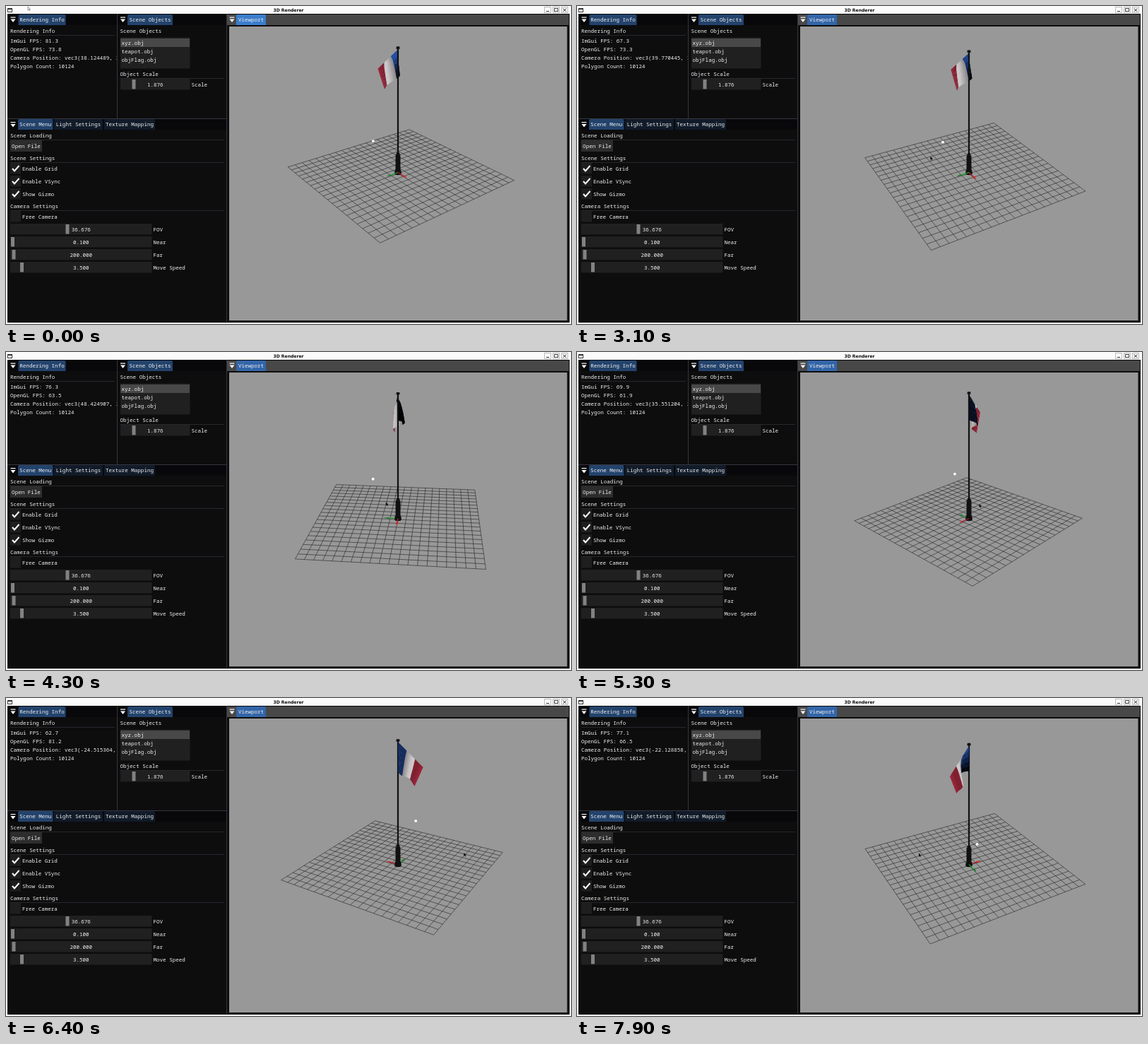
Write an HTML page with a canvas that moves like this. It is 800 by 450 pixels and loops after 8 s.

```html
<!DOCTYPE html>
<html lang="en">
<head>
<meta charset="utf-8">
<title>3D Renderer</title>
<style>
html, body { margin: 0; width: 100%; height: 100%; overflow: hidden; background: #000; }
canvas { display: block; width: 800px; height: 450px; }
</style>
</head>
<body>
<canvas id="stage" width="800" height="450"></canvas>
<script>
const ctx = document.getElementById('stage').getContext('2d');
const MONO = '7.55px "Noto Sans Mono", "DejaVu Sans Mono", monospace';
const LOOP = 8000, STEP = 100, DRAG_START = 2700;
const FOCAL = 627.5, DIST = 55, CX = 555, CY = 237;

// time, azimuth, elevation (degrees), pointer x, pointer y
const POSES = [
  [2100, 38, 28.4, 31, 1],
  [DRAG_START, 38, 28.4, 488, 214],
  [3700, 17.3, 28.4, 519, 211],
  [5300, -43.6, 26.8, 569.5, 215],
  [5900, -88.5, 27.5, 636.5, 221.5],
  [7100, -166, 32.2, 665, 215.5],
  [7900, -240.7, 34.7, 484, 219.5]
];

const noise = n => { const s = Math.sin(n * 12.9898) * 43758.5453; return s - Math.floor(s); };
const clamp = v => Math.max(0, Math.min(1, v));

function poseAt(t) {
  const next = POSES.findIndex(p => p[0] > t);
  const i = next < 0 ? POSES.length - 1 : Math.max(1, next);
  const a = POSES[i - 1], b = POSES[i], p = clamp((t - a[0]) / (b[0] - a[0]));
  const [azimuth, elevation, x, y] = a.slice(1).map((v, k) => v + (b[k + 1] - v) * p);
  // the first drag lifts the view and lets it sink again
  const lift = 5.5 * Math.sin(Math.PI * clamp((t - DRAG_START) / 1000));
  return { azimuth, elevation: elevation + lift, x, y };
}

function rect(x, y, w, h, color) {
  ctx.fillStyle = color;
  ctx.fillRect(x, y, w, h);
}

function text(s, x, y, align = 'left', font = MONO, color = '#f0f0f0') {
  ctx.font = font;
  ctx.fillStyle = color;
  ctx.textAlign = align;
  ctx.fillText(s, x, y + 2.6);
}

function trace(points) {
  ctx.beginPath();
  points.forEach(p => ctx.lineTo(p[0], p[1]));
}

function poly(points, color) {
  trace(points);
  ctx.fillStyle = color;
  ctx.fill();
}

function stroke(points, color, width) {
  trace(points);
  ctx.strokeStyle = color;
  ctx.lineWidth = width;
  ctx.stroke();
}

function disc(x, y, rx, ry, color) {
  ctx.beginPath();
  ctx.ellipse(x, y, rx, ry, 0, 0, Math.PI * 2);
  ctx.fillStyle = color;
  ctx.fill();
}

function tab(label, x, y, w, color) {
  ctx.beginPath();
  ctx.roundRect(x, y, w, 15, [2, 2, 0, 0]);
  ctx.fillStyle = color;
  ctx.fill();
  text(label, x + w / 2, y + 7.5, 'center');
}

function menuIcon(x, y) {
  rect(x - 3.5, y - 4, 7, 1.2, '#fff');
  poly([[x - 3.5, y - 1], [x + 3.5, y - 1], [x, y + 3.5]], '#fff');
}

function heading(label, x, y, right) {
  text(label, x, y);
  rect(x, y + 6, right - x, 1, '#28282d');
}

function slider(label, value, x, y, w, grab) {
  rect(x, y - 8, w, 15.5, '#202021');
  rect(grab, y - 7, 5, 13.5, '#828282');
  text(value, x + w / 2, y, 'center');
  text(label, x + w + 2, y);
}

function checkbox(label, y, on) {
  rect(6, y - 8, 15, 15.5, '#1e1e1f');
  if (on) stroke([[9, y], [12, y + 3.5], [18.5, y - 4]], '#fff', 2);
  text(label, 23, y);
}

function titleBar() {
  rect(0, 0, 800, 11, '#fbfbfb');
  text('3D Renderer', 400, 5.3, 'center', 'bold 6.1px "DejaVu Sans", sans-serif', '#111');
  rect(2, 3, 7, 6, '#333');
  rect(3, 5, 5, 3, '#fff');
  ctx.lineWidth = 1;
  for (let x = 762; x < 790; x += 12) {
    ctx.strokeStyle = '#bbb';
    ctx.strokeRect(x + .5, 1.5, 9, 8);
  }
  rect(765, 7, 4, 1, '#333');
  ctx.strokeStyle = '#444';
  ctx.strokeRect(776.5, 3.5, 5, 4);
  stroke([[788.5, 3.5], [793.5, 8]], '#333', 1);
  stroke([[793.5, 3.5], [788.5, 8]], '#333', 1);
}

function frames() {
  rect(0, 11, 800, 439, '#fbfbfb');
  rect(2, 11, 796, 437, '#08080a');
  rect(3, 27, 309, 420, '#0d0d0e');
  rect(313, 12, 484, 15, '#484848');
  rect(313, 27, 484, 420, '#0d0d0e');
  rect(157, 11, 1, 148, '#35353e');
  rect(312, 11, 1, 436, '#35353e');
  rect(2, 159, 310, 1, '#35353e');
  rect(3, 160, 309, 15, '#08080a');
}

function infoPanel(step, cam) {
  const rate = seed => (61 + 22 * noise(step + seed)).toFixed(1);
  heading('Rendering Info', 6, 35, 154);
  ctx.save();
  ctx.beginPath();
  ctx.rect(3, 27, 153.5, 131);
  ctx.clip();
  [
    'ImGui FPS: ' + rate(1),
    'OpenGL FPS: ' + rate(200),
    `Camera Position: vec3(${cam.x.toFixed(6)}, ${cam.y.toFixed(6)}`,
    'Polygon Count: 10124'
  ].forEach((s, i) => text(s, 6, 49 + i * 12));
  ctx.restore();
}

function panels(hovered) {
  const blue = '#23436c', dim = '#111b29';
  menuIcon(10, 19.5);
  menuIcon(165.5, 19.5);
  menuIcon(320, 19.5);
  menuIcon(10, 168);
  tab('Rendering Info', 17.5, 12, 67, blue);
  tab('Scene Objects', 172, 12, 64, blue);
  tab('Viewport', 326, 12, 42, hovered ? '#3b7dcc' : '#3365a8');
  tab('Scene Menu', 17, 160, 49.5, blue);
  tab('Light Settings', 68, 160, 69, dim);
  tab('Texture Mapping', 139, 160, 72, dim);

  text('Scene Objects', 161.5, 35);
  rect(162, 44.5, 98.5, 44, '#202021');
  rect(162, 46, 98, 12, '#484848');
  ['xyz.obj', 'teapot.obj', 'objFlag.obj'].forEach((s, i) => text(s, 163.5, 52 + i * 12));
  heading('Object Scale', 161.5, 96, 309);
  slider('Scale', '1.876', 162, 111, 98.5, 178.5);

  heading('Scene Loading', 6, 183, 309);
  rect(6, 190, 45, 16, '#2d2d2d');
  text('Open File', 28.5, 198, 'center');
  heading('Scene Settings', 6, 215, 309);
  ['Enable Grid', 'Enable VSync', 'Show Gizmo'].forEach((s, i) => checkbox(s, 230 + i * 18, true));
  heading('Camera Settings', 6, 283, 309);
  checkbox('Free Camera', 298, false);
  [['FOV', '36.676', 84.5], ['Near', '0.100', 7], ['Far', '200.000', 8.5], ['Move Speed', '3.500', 20]]
    .forEach(([label, value, grab], i) => slider(label, value, 6, 316 + i * 18, 200.5, grab));
}

function camera(azimuth, elevation) {
  const t = azimuth * Math.PI / 180, e = elevation * Math.PI / 180;
  const st = Math.sin(t), ct = Math.cos(t), se = Math.sin(e), ce = Math.cos(e);
  const near = (x, z) => x * ct + z * st;
  const project = (x, y, z) => {
    const v = near(x, z), k = FOCAL / (DIST - y * se - v * ce);
    return [CX + (x * st - z * ct) * k, CY - (y * ce - v * se) * k, k];
  };
  return { near, project, x: DIST * ce * ct, y: DIST * se };
}

function flag(cam) {
  const N = 18, M = 5, facing = cam.near(.27, .96);
  const colors = [[34, 80, 176], [206, 202, 204], [174, 38, 62]];
  const point = (u, w) => {
    const along = u * (1 - .32 * w);
    const y = 15.2 - 2.55 * u - w * (2.8 - .58 * u);
    const wave = -1.15 * Math.sin(u * Math.PI * 2) * (1 - u) * Math.sqrt(w);
    return cam.project(-2.72 * along + .27 * wave, y, .78 * along + .96 * wave);
  };
  const blueLight = w => Math.abs(facing) ** 1.5 * (facing < 0 ? .55 : Math.max(.15, 1.3 - 1.5 * w));
  const cells = [];
  for (let i = 0; i < N; i++) for (let j = 0; j < M; j++) {
    const u = i / N, w = j / M;
    const u2 = Math.min(1, u + 1.12 / N), w2 = Math.min(1, w + 1.06 / M);
    const band = Math.floor(i * 3 / N);
    const light = [blueLight(w), .7 + .3 * clamp((u - .33) * 5), .86 + .14 * Math.sin(u * 9 - 2)][band];
    const points = [point(u, w), point(u2, w), point(u2, w2), point(u, w2)];
    cells.push({ points, color: `rgb(${colors[band].map(v => Math.round(v * light))})` });
  }
  cells.sort((a, b) => a.points[0][2] - b.points[0][2]);
  cells.forEach(c => poly(c.points, c.color));
}

function pole(cam) {
  const post = (low, high, r1, r2) => {
    const a = cam.project(0, low, 0), b = cam.project(0, high, 0);
    const p = r1 * a[2], q = r2 * b[2];
    poly([[CX - p, a[1]], [CX - q, b[1]], [CX + q, b[1]], [CX + p, a[1]]], '#111');
  };
  post(0, 15.4, .1, .085);
  post(15.25, 15.5, .2, .16);
  post(0, 2.6, .31, .29);
  post(2.6, 2.9, .25, .16);
  post(0, .5, .42, .38);
  disc(CX, CY, 4.7, 2.2, '#111');
}

function axis(cam, dx, dz, color, tipColor) {
  const at = (along, side) => cam.project(dx * along - dz * side, .15, dz * along + dx * side);
  stroke([at(0, 0), at(1.2, 0)], color, 1.3);
  poly([at(1.1, .2), at(1.8, 0), at(1.1, -.2)], tipColor);
}

function scene(cam) {
  ctx.save();
  ctx.beginPath();
  ctx.rect(316, 29, 478.5, 416);
  ctx.clip();
  rect(316, 29, 479, 416, '#989898');
  for (let i = -10; i <= 10; i++) {
    stroke([cam.project(i, 0, -10), cam.project(i, 0, 10)], '#2c2c2c', .65);
    stroke([cam.project(-10, 0, i), cam.project(10, 0, i)], '#2c2c2c', .65);
  }
  const axes = [[1, 0, '#b0182c', '#d02a2a'], [0, 1, '#23a035', '#1c7a30']];
  const drawAxes = front => axes.forEach(a => {
    if (cam.near(a[0], a[1]) > 0 === front) axis(cam, ...a);
  });
  const parts = [flag, pole];
  if (cam.near(-2.72, .78) > 0) parts.reverse();
  drawAxes(false);
  parts.forEach(part => part(cam));
  drawAxes(true);
  const [x, y] = cam.project(-.7, 5, 3.1);
  disc(x, y, 1.9, 1.9, '#fff');
  ctx.restore();
}

function pointer(x, y, light) {
  const shape = [[0, 0], [0, 5], [1.2, 4], [2, 5.6], [2.8, 5.2], [2, 3.6], [3.5, 3.5], [0, 0]]
    .map(p => [x + p[0], y + p[1]]);
  poly(shape, light ? '#eee' : '#0a0a0a');
  if (light) stroke(shape, '#777', .7);
}

function draw(now) {
  const step = Math.floor(now % LOOP / STEP), t = step * STEP;
  const pose = poseAt(t), cam = camera(pose.azimuth, pose.elevation);
  frames();
  panels(t <= DRAG_START);
  infoPanel(step, cam);
  scene(cam);
  titleBar();
  pointer(pose.x, pose.y, pose.y < 11);
}

const start = performance.now();
function tick() {
  draw(performance.now() - start);
  requestAnimationFrame(tick);
}
tick();
</script>
</body>
</html>
```
